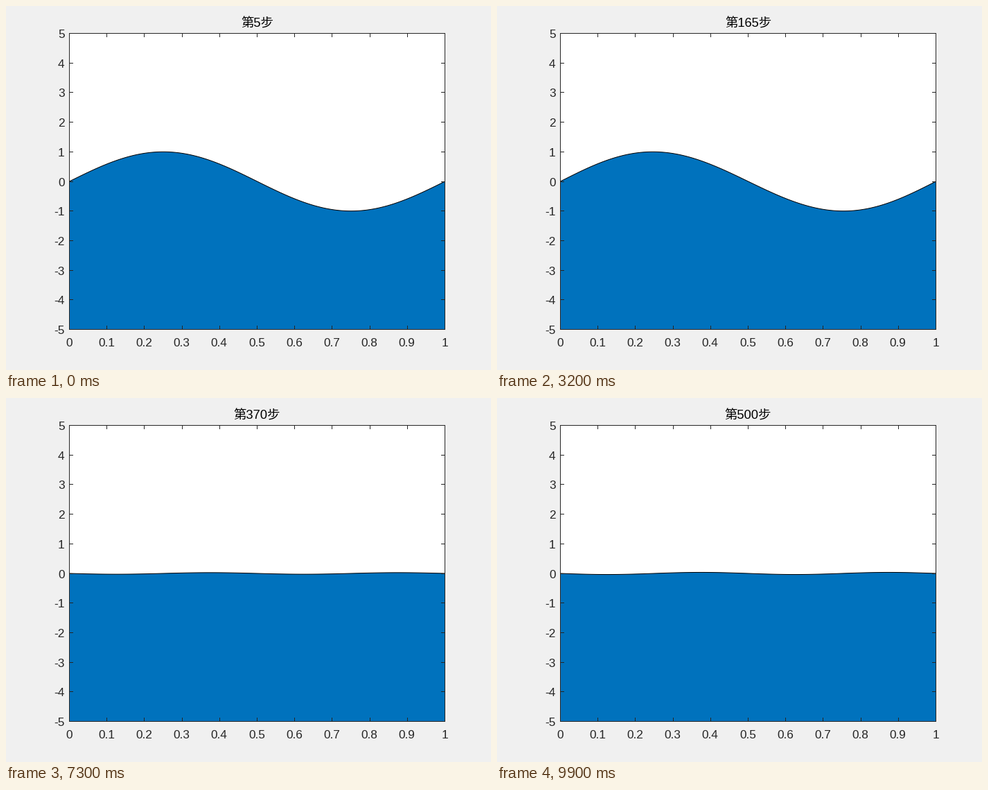
Recreate the animation shown at these times as a matplotlib script. Size 700 by 525 pixels, loop 10 s.

```python
import numpy as np
import matplotlib.pyplot as plt
from matplotlib.animation import FuncAnimation
from matplotlib.collections import LineCollection
from matplotlib.patches import Polygon

W, H, DPI = 700, 525, 100
LEFT, RIGHT, TOP, BOTTOM = 91.5, 633.5, 39.5, 466.5
TICK = 5.5
INK = "#262626"
FRAMES, STEPS_PER_FRAME = 100, 5


def pt(px):
    return px * 72 / DPI


def to_x(v):
    return LEFT + v * (RIGHT - LEFT)


def to_y(v):
    return (TOP + BOTTOM) / 2 - v * (BOTTOM - TOP) / 10


def crisp(v):
    return np.floor(v) + 0.5


def surface(x, n):
    """Standing wave plus a second mode whose phase slowly drifts."""
    first = np.sin(np.pi * n / 10) * np.sin(2 * np.pi * x)
    drift = -7.2e-5 * n * np.cos(np.pi * n / 5) * np.sin(4 * np.pi * x)
    return first + drift


fig = plt.figure(figsize=(W / DPI, H / DPI), dpi=DPI, facecolor="#f0f0f0")
ax = fig.add_axes([0, 0, 1, 1])
ax.set_xlim(0, W)
ax.set_ylim(H, 0)
ax.axis("off")

ax.add_patch(Polygon([(LEFT, TOP), (RIGHT, TOP), (RIGHT, BOTTOM), (LEFT, BOTTOM)],
                     facecolor="white", edgecolor="none", snap=False, zorder=1))

grid = np.linspace(0, 1, 201)
water = Polygon([(LEFT, BOTTOM), (RIGHT, BOTTOM)], facecolor="#0072bd",
                edgecolor="black", linewidth=pt(1), joinstyle="miter",
                snap=False, zorder=2)
ax.add_patch(water)

lines = [[(LEFT - 0.5, y), (RIGHT + 0.5, y)] for y in (TOP, BOTTOM)]
lines += [[(x, TOP), (x, BOTTOM)] for x in (LEFT, RIGHT)]
label = dict(family="Liberation Sans", fontsize=pt(17.3), color=INK, va="baseline")

for k in range(11):
    x = to_x(k / 10)
    cx = crisp(x)
    lines += [[(cx, TOP), (cx, TOP + TICK)], [(cx, BOTTOM), (cx, BOTTOM - TICK)]]
    ax.text(x - 0.5, 491, f"{k / 10:g}", ha="center", **label)

    y = to_y(k - 5)
    cy = crisp(y)
    lines += [[(LEFT, cy), (LEFT + TICK, cy)], [(RIGHT, cy), (RIGHT - TICK, cy)]]
    ax.text(84.5, y + 6.5, str(k - 5), ha="right", **label)

frame = LineCollection(lines, colors=INK, linewidths=pt(1), capstyle="butt", zorder=3)
frame.set_snap(False)
ax.add_collection(frame)

title = ax.text((LEFT + RIGHT) / 2, 31, "", ha="center", va="baseline", color="black",
                family=["Liberation Sans", "Noto Sans CJK JP"], fontsize=pt(18.33))


def draw(i):
    n = STEPS_PER_FRAME * (i + 1)
    top = np.column_stack([to_x(grid), to_y(surface(grid, n))])
    water.set_xy(np.vstack([top, (RIGHT, BOTTOM), (LEFT, BOTTOM)]))
    title.set_text(f"第{n}步")
    return water, title


anim = FuncAnimation(fig, draw, frames=FRAMES, init_func=lambda: draw(0),
                     interval=100, repeat=True, repeat_delay=0)
plt.show()
```
